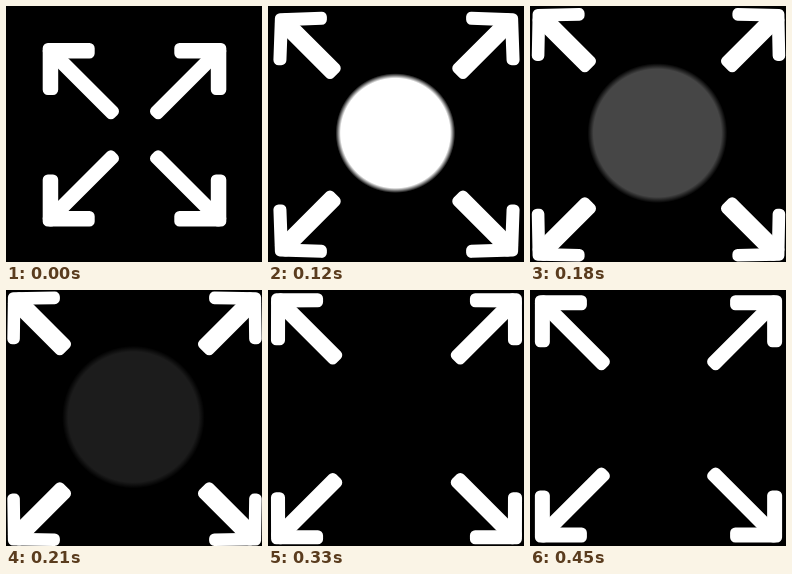
These frames come from a looping animation (256 px wide and 256 px high, 480 ms). An HTML page with a canvas:

```html
<!DOCTYPE html>
<html lang="en">
<head>
<meta charset="utf-8">
<title>Expand</title>
<style>
  html, body { margin: 0; width: 100%; height: 100%; overflow: hidden; background: #000; }
  canvas { display: block; width: 100vw; height: 100vh; filter: blur(.55px); }
</style>
</head>
<body>
<canvas id="stage" width="256" height="256"></canvas>
<script>
const ctx = document.getElementById('stage').getContext('2d');
const LOOP = 480, STEP = 30, PEAK = 240, ROUND = 5.2, ARM = 52;

const part = (t, from, length) => Math.min(1, Math.max(0, (t - from) / length));
const easeOut = (u, power) => 1 - (1 - u) ** power;

// Distances are measured outward from the centre of the stage.
function pose(t) {
  const fly = easeOut(part(t, 0, 255), 3);
  const grow = 1 - Math.exp(-((t / 85) ** 1.66));
  const settle = easeOut(part(t, PEAK, 230), 2);
  const drift = part(t, PEAK, LOOP - STEP - PEAK);
  const pulse = t / 60 * Math.exp(1 - t / 60);
  return {
    corner: 91.8 + 35 * fly - 3.2 * drift,
    spread: 2 * pulse,
    bar: 15.5 - 3 * grow + 2.5 * settle,
    tail: 15.5 + 48.5 * grow - 15.5 * settle,
    shaft: 14.5 + 4.5 * grow - 4 * settle,
    radius: 69 * grow,
    glow: 1 - easeOut(part(t, 120, 180), 3.2)
  };
}

function roundedShape(points) {
  ctx.beginPath();
  points.forEach(([x, y]) => ctx.lineTo(x, y));
  ctx.closePath();
  ctx.fill();
  ctx.stroke();
}

// Points are inset by ROUND; the round stroke restores the full size.
function arrow({ corner, spread, bar, tail, shaft }) {
  const c = corner - ROUND, thick = bar - 2 * ROUND;
  const a = corner - ARM + ROUND, out = c + spread, j = c - thick;
  roundedShape([[c, c], [a, out], [a, out - thick], [j, j], [out - thick, a], [out, a]]);

  const k = (shaft / 2 - ROUND) / Math.SQRT2;
  const q = tail + ROUND + k, m = c - k;
  roundedShape([[q - k, q + k], [q + k, q - k], [m + k, m - k], [m - k, m + k]]);
}

function disc({ radius, glow }) {
  if (radius <= 0 || glow <= 0) return;
  const soft = radius * .045, edge = radius + soft;
  const fill = ctx.createRadialGradient(0, 0, radius - soft, 0, 0, edge);
  fill.addColorStop(0, `rgba(255,255,255,${glow})`);
  fill.addColorStop(1, 'rgba(255,255,255,0)');
  ctx.setTransform(1, 0, 0, 1, 127.4, 127.1);
  ctx.fillStyle = fill;
  ctx.beginPath();
  ctx.arc(0, 0, edge, 0, 2 * Math.PI);
  ctx.fill();
}

function draw(t) {
  const p = pose(t);
  ctx.setTransform(1, 0, 0, 1, 0, 0);
  ctx.fillStyle = '#000';
  ctx.fillRect(0, 0, 256, 256);
  disc(p);

  ctx.fillStyle = ctx.strokeStyle = '#fff';
  ctx.lineWidth = 2 * ROUND;
  ctx.lineJoin = 'round';
  for (const sx of [-1, 1]) {
    for (const sy of [-1, 1]) {
      ctx.setTransform(sx, 0, 0, sy, 128.5, 128.8);
      arrow(p);
    }
  }
}

const start = performance.now();
function tick() {
  const t = (performance.now() - start) % LOOP;
  draw(Math.floor(t / STEP) * STEP);
  requestAnimationFrame(tick);
}
tick();
</script>
</body>
</html>
```
